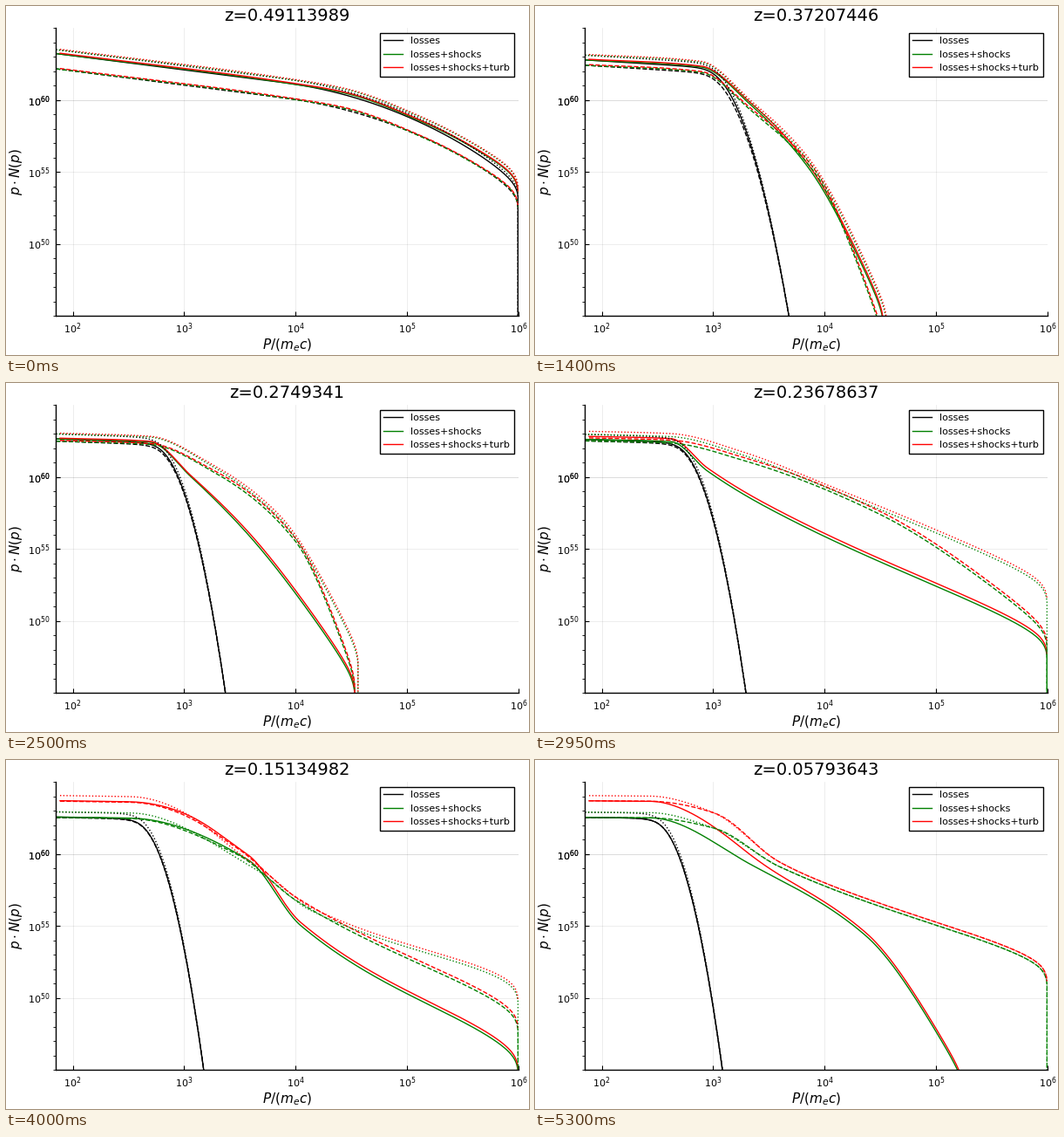
Animation, 600 px wide and 400 px high, one loop 5.35 s. Source, as a matplotlib script:

```python
import numpy as np
import matplotlib.pyplot as plt
from matplotlib.animation import FuncAnimation

FRAMES, STEP = 107, 50
W, H = 600, 400
LEFT, RIGHT, TOP, BOTTOM = 57.2, 588.19, 25, 355
DECADE = 127.91  # pixels per power of ten along x
CENTER = 322.2

# Key times, with redshift and the cooling knee (onset, floor crossing)
TIMES = [0, 17, 40, 59, 71, 89, 106]
REDSHIFT = [0.49113989, 0.4209801, 0.31812358, 0.23678637,
            0.18698215, 0.117275, 0.05793643]
ONSET = [320, 211, 183, 161, 155, 145, 138]
FLOOR = [770, 336, 265, 242, 232, 222, 215]

# Low-energy plateau of each run: first and final height
PLATEAU = {"-": (54.5, 66), "--": (72, 65.5), ":": (50, 60)}

# Shock tails beyond the knee: three points per key time, shared between runs
TAILS = [
    {"- -- :": [(390, 100), (480, 133), (588, 186)]},
    {"- :": [(262, 111), (330, 160), (588, 303)],
     "--": [(262, 122), (350, 169), (588, 349)]},
    {"- --": [(235, 115), (300, 210), (360, 375)],
     ":": [(235, 110), (300, 194), (364, 375)]},
    {"-": [(198, 101), (265, 142), (588, 287)],
     "--": [(240, 89), (395, 150), (588, 275)],
     ":": [(240, 83), (332, 119), (588, 224)]},
    {"-": [(300, 115), (440, 206), (588, 354)],
     "-- :": [(260, 99), (320, 121), (588, 194)]},
    {"-": [(262, 114), (304, 173), (588, 307)],
     "--": [(270, 117), (350, 201), (588, 373)],
     ":": [(340, 152), (420, 224), (588, 307)]},
    {"-": [(250, 121), (380, 201), (492, 353)],
     "-- :": [(205, 78), (280, 122), (588, 230)]},
]


def smooth(x, xs, ys):
    """Monotone cubic through the given points."""
    h, d = np.diff(xs), np.diff(ys) / np.diff(xs)
    m = np.concatenate([d[:1], np.zeros(len(d) - 1), d[-1:]])
    for i in range(1, len(d)):
        if d[i - 1] * d[i] > 0:
            a, b = 2 * h[i] + h[i - 1], h[i] + 2 * h[i - 1]
            m[i] = (a + b) / (a / d[i - 1] + b / d[i])
    i = np.clip(np.searchsorted(xs, x) - 1, 0, len(h) - 1)
    u = (x - xs[i]) / h[i]
    return (ys[i] * (1 + 2 * u) * (1 - u) ** 2 + ys[i + 1] * u * u * (3 - 2 * u)
            + h[i] * u * (1 - u) * (m[i] * (1 - u) - m[i + 1] * u))


def mix(a, b, u):
    return a + (b - a) * u


def cool(a, b, u):
    """Blend positions so that 1/p changes evenly, as radiative losses do."""
    a, b = np.asarray(a, float), np.asarray(b, float)
    return -DECADE * np.log10(mix(10 ** (-a / DECADE), 10 ** (-b / DECADE), u))


def ramp(d, soft=20):
    """Zero below the knee, rising linearly above it, rounded between."""
    return (d + np.hypot(d, soft)) / 2


def ease(u):
    u = np.clip(u, 0, 1)
    return u * u * (3 - 2 * u)


def cutoff(x, end):
    return -np.log(np.maximum(1 - 10 ** ((x - end) / DECADE), 1e-9))


def samples(start, end):
    return np.concatenate([np.linspace(start, end - 31, 300),
                           end - np.geomspace(30, 0.6, 40)])


def segment(t):
    i = min(np.searchsorted(TIMES, t, side="right") - 1, len(TIMES) - 2)
    return i, (t - TIMES[i]) / (TIMES[i + 1] - TIMES[i])


def knee(t):
    i, u = segment(t)
    return cool((ONSET[i], FLOOR[i]), (ONSET[i + 1], FLOOR[i + 1]), u)


def height(style, t):
    first, final = PLATEAU[style]
    return mix(final, first, np.exp(-t / 28))


def plateau(x, style, t):
    return height(style, t) + 0.127 * np.exp(-t / 38) * (x - LEFT)


def drop(x, y):
    """Close a curve with a vertical line down to the floor."""
    if y[-1] < BOTTOM + 5:
        x, y = np.append(x, x[-1]), np.append(y, BOTTOM + 5)
    return x, y


def losses(style, t):
    onset, floor = knee(t)
    x = samples(LEFT, min(floor + 3, 588))
    depth = BOTTOM - plateau(floor, style, t)
    y = plateau(x, style, t) + depth * (ramp(x - onset) / ramp(floor - onset)) ** 2
    y += 5 * max(0, 1 - t / TIMES[1]) * cutoff(x, 588)
    return drop(x, y)


def tail(style, i):
    return np.array(next(v for k, v in TAILS[i].items() if style in k.split()), float)


def shocked(style, t, turb):
    i, u = segment(t)
    a, b = tail(style, i), tail(style, i + 1)
    body = np.array([LEFT, knee(t)[0] - 5])
    xs = np.append(body, cool(a[:, 0], b[:, 0], u))
    # Runs start out offset from each other and soon share their tails
    offset = (height(style, t) - height("-", t)) * np.exp(-t / 10)
    ys = np.append(plateau(body, style, t), mix(a[:, 1], b[:, 1], u) + offset)
    end = xs[-1]
    x = samples(62 if turb else LEFT, end)
    y = smooth(x, xs, ys) + 6 * cutoff(x, end)
    if turb:
        gain = 1 + 18 * ease((t - 52) / 30)
        y -= mix(gain, 3.5 - 2.5 * np.exp(-t / 10), 1 / (1 + np.exp((245 - x) / 18)))
    if end < 587 or (not turb and t > 0):
        x, y = drop(x, y)
    return x, y


plt.rcParams["font.family"] = "DejaVu Sans"
fig = plt.figure(figsize=(W / 100, H / 100), dpi=100, facecolor="white")
ax = fig.add_axes([LEFT / W, 1 - BOTTOM / H, (RIGHT - LEFT) / W, (BOTTOM - TOP) / H])
ax.set(xlim=(LEFT, RIGHT), ylim=(BOTTOM, TOP))
ax.spines[["top", "right"]].set_visible(False)
ax.spines[["left", "bottom"]].set_linewidth(1)

# 10^60 is marked twice, which darkens its label and grid line
powers = [60, 60, 55, 50]
xticks = [RIGHT - DECADE * k for k in range(4, -1, -1)]
ax.set_xticks(xticks, [f"$10^{{{k}}}$" for k in range(2, 7)])
ax.set_xticks(xticks, minor=True)
ax.set_yticks([107.5 + 16.5 * (60 - d) for d in powers],
              [f"$10^{{{d}}}$" for d in powers])
ax.set_yticks([TOP + 16.5 * k for k in range(21)], minor=True)
ax.tick_params(direction="in", length=3.5, width=0.8, labelsize=8, pad=4.5)
ax.tick_params(which="minor", direction="out", length=2, width=0.6)
ax.grid(color="black", alpha=0.1, linewidth=0.5)
ax.set_axisbelow(True)

fig.text(CENTER / W, 1 - 388.7 / H, "$P/(m_e c)$", size=11, ha="center", va="center")
fig.text(11.5 / W, 1 - 190 / H, r"$p \cdot N(p)$", size=11, rotation=90,
         ha="center", va="center")
title = fig.text(CENTER / W, 1 - 17.3 / H, "", size=14, ha="center", va="baseline")

NAMES = {"black": "losses", "green": "losses+shocks", "red": "losses+shocks+turb"}
lines = {(style, color): ax.plot([], [], style, color=color, lw=1,
                                 label=name if style == "-" else None)[0]
         for style in PLATEAU for color, name in NAMES.items()}
ax.legend(loc="upper right", fontsize=8, fancybox=False, framealpha=1,
          edgecolor="black").get_frame().set_linewidth(1)


def draw(t):
    z = smooth(np.array([float(t)]), np.array(TIMES, float), np.array(REDSHIFT))[0]
    title.set_text(f"z={z:.8g}")
    for (style, color), line in lines.items():
        if color == "black":
            line.set_data(*losses(style, t))
        else:
            line.set_data(*shocked(style, t, color == "red"))
    return [title, *lines.values()]


anim = FuncAnimation(fig, draw, frames=FRAMES, interval=STEP, repeat=True,
                     repeat_delay=0, blit=False)
plt.show()
```
